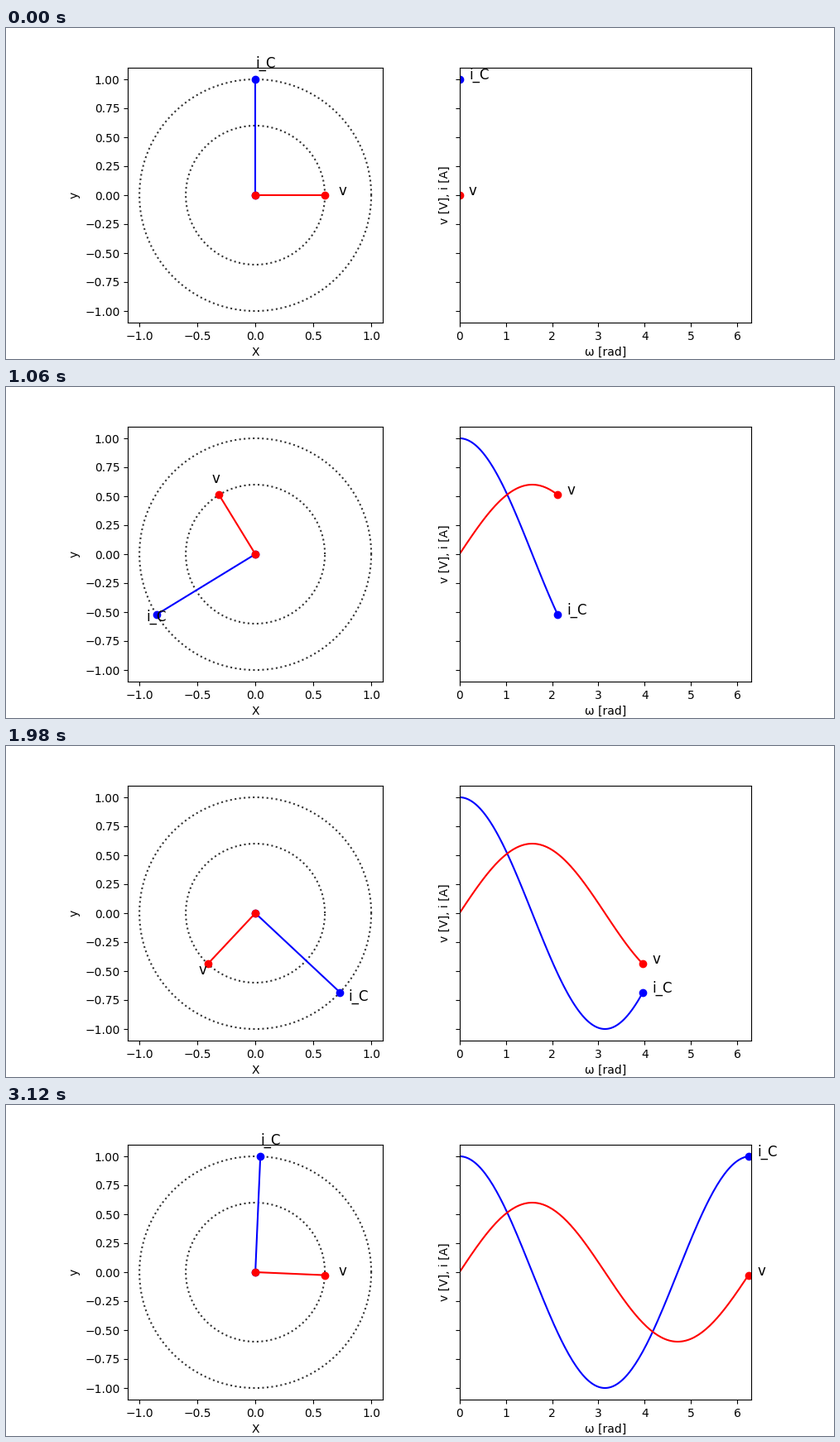
Recreate the animation shown at these times as a matplotlib script. Size 1000 by 400 pixels, loop 3.14 s.

```python
import numpy as np
import matplotlib.pyplot as plt
from matplotlib.animation import FuncAnimation

FRAMES = 157
STEP = 0.04  # radians per frame
V_AMP, I_AMP = 0.6, 1.0

fig, (ax_ph, ax_wave) = plt.subplots(1, 2, sharey=True, figsize=(10, 4), dpi=100)

ax_ph.set_aspect('equal')
ax_ph.set_xlim(-1.1, 1.1)
ax_ph.set_ylim(-1.1, 1.1)
ax_ph.set_xlabel('X')
ax_ph.set_ylabel('y')
ax_wave.set_xlim(0, 6.3)
ax_wave.set_xlabel('ω [rad]')
ax_wave.set_ylabel('v [V], i [A]')

turn = np.linspace(0, 2 * np.pi, 200)
for r in (I_AMP, V_AMP):
    ax_ph.plot(r * np.cos(turn), r * np.sin(turn), 'k:', alpha=0.8)


class Signal:
    """A rotating phasor together with its projected wave."""

    def __init__(self, name, color, amp, phase, reach):
        self.amp, self.phase, self.reach = amp, phase, reach
        self.arm, = ax_ph.plot([], [], 'o-', color=color)
        self.wave, = ax_wave.plot([], [], color=color)
        self.tip, = ax_wave.plot([], [], 'o', color=color)
        self.arm_label = ax_ph.text(0, 0, name, fontsize=12)
        self.tip_label = ax_wave.text(0, 0, name, fontsize=12)

    def update(self, angles):
        now = angles[-1]
        x = self.amp * np.cos(now + self.phase)
        y = self.amp * np.sin(now + self.phase)
        self.arm.set_data([0, x], [0, y])
        self.arm_label.set_position((self.reach * x, self.reach * y))
        self.wave.set_data(angles, self.amp * np.sin(angles + self.phase))
        self.tip.set_data([now], [y])
        self.tip_label.set_position((now + 0.2, y))
        return self.arm, self.wave, self.tip, self.arm_label, self.tip_label


signals = [
    Signal('i_C', 'blue', I_AMP, np.pi / 2, 1.1),
    Signal('v', 'red', V_AMP, 0, 1.2),
]


def draw(frame):
    angles = STEP * np.arange(frame + 1)
    return [artist for s in signals for artist in s.update(angles)]


anim = FuncAnimation(fig, draw, frames=FRAMES, interval=20,
                     repeat=True, repeat_delay=0, blit=False)
plt.show()
```
